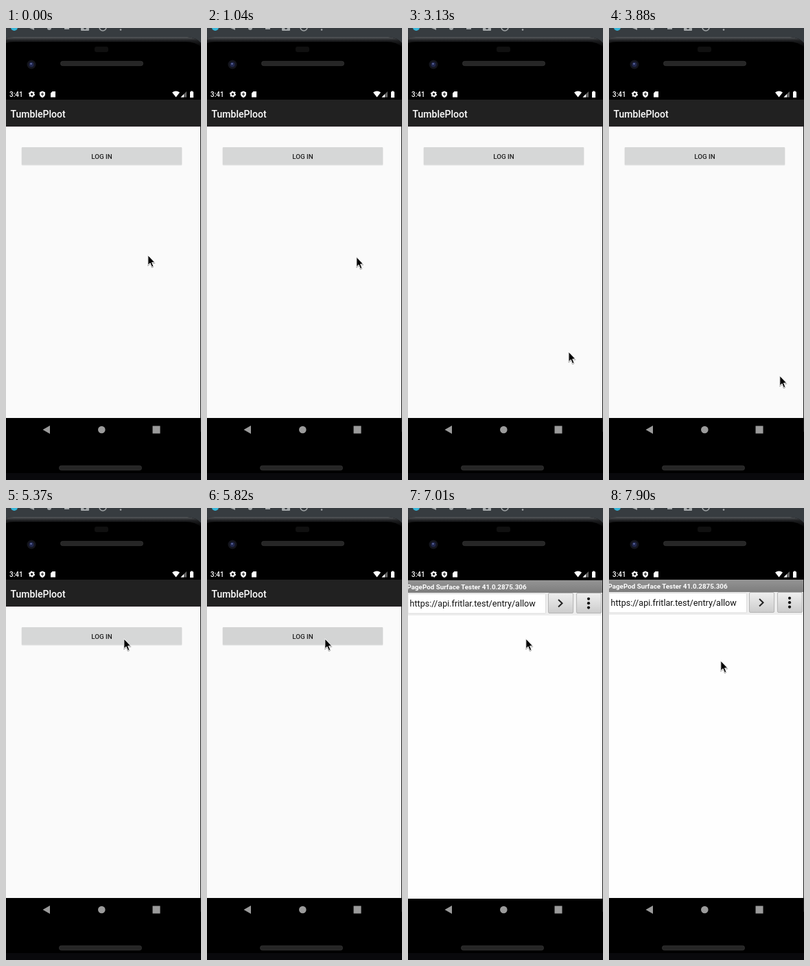
An HTML page for the animation above (8000 ms loop, 284 by 656 pixels).

```html
<!DOCTYPE html>
<html lang="en">
<head>
<meta charset="utf-8">
<title>Log in</title>
<style>
html, body { margin: 0; width: 100%; height: 100%; overflow: hidden; background: #000; }
svg { display: block; width: 284px; height: 656px; font-family: Roboto, sans-serif; }
.medium { font-weight: 500; }
</style>
</head>
<body>
<svg viewBox="0 0 284 656">
  <defs>
    <linearGradient id="titleBar" x2="0" y2="1">
      <stop stop-color="#949494"/><stop offset="1" stop-color="#7d7d7d"/>
    </linearGradient>
    <linearGradient id="key" x2="0" y2="1">
      <stop stop-color="#efefef"/><stop offset="1" stop-color="#cccccc"/>
    </linearGradient>
    <linearGradient id="rim" x2="0" y2="1">
      <stop stop-color="#55585b"/><stop offset=".35" stop-color="#1d1e20"/><stop offset="1" stop-color="#000"/>
    </linearGradient>
    <clipPath id="field"><rect y="122" width="195.5" height="32"/></clipPath>
    <clipPath id="reveal"><rect id="revealBox" width="284" height="656"/></clipPath>
  </defs>

  <!-- emulator toolbar and phone body -->
  <rect width="284" height="24" fill="#373c40"/>
  <circle cx="12" cy="-1" r="5" fill="#35b5d8"/>
  <g fill="#a4a8aa">
    <path d="M34 0h7v3z"/><circle cx="63" cy="0" r="3"/><rect x="85" width="7" height="2"/>
    <rect x="109" y="-3" width="12" height="7" rx="1"/><circle cx="167" cy="2.5" r="1.3"/>
  </g>
  <circle cx="115" cy="0" r="2" fill="#373c40"/>
  <circle cx="141" cy="-1" r="5" fill="none" stroke="#a4a8aa" stroke-width="1.5"/>
  <path d="M0 15Q3 13 12 13H264Q278 14 284 22V656H0z" fill="#000"/>
  <path d="M0 15Q3 13 12 13H264Q278 14 284 22V28Q276 20 262 20H12Q4 20 0 22z" fill="url(#rim)"/>
  <rect x="129" y="27" width="20" height="8" rx="3" fill="#101010"/>
  <circle cx="37" cy="53" r="6.5" fill="#14151d"/>
  <circle cx="37" cy="53" r="3.5" fill="#20264c"/>
  <circle cx="36.5" cy="52" r="1.2" fill="#6570a8"/>
  <g fill="#262626" stroke="#393939" stroke-width=".7">
    <rect x="79.5" y="48.3" width="120" height="6.4" rx="3"/>
    <rect x="77.5" y="635.3" width="120" height="6.4" rx="3"/>
  </g>
  <rect y="646" width="284" height="10" fill="#09090c"/>

  <!-- status bar -->
  <g fill="#fff">
    <text x="5" y="100" font-size="10" class="medium">3:41</text>
    <circle cx="37.5" cy="96" r="2.7" fill="none" stroke="#fff" stroke-width="2"/>
    <circle cx="37.5" cy="96" r="4" fill="none" stroke="#fff" stroke-width="1.2" stroke-dasharray="2 2.19"/>
    <path d="M53 91.5l4 1.7v3q0 3.2-4 4.8q-4-1.6-4-4.8v-3z"/>
    <path d="M67.5 92H72v8.5H65v-6z"/>
    <path d="M242 93.5q5.5-4 11 0l-5.5 7z"/>
    <path d="M263 92v8.5h-8.5z" fill="#666"/><path d="M259 96v4.5h-4.5z"/>
    <path d="M268 92.5h1.3v-1h2.4v1h1.3v8.5h-5z"/>
  </g>
  <path d="M53 93.5v5M50.8 96h4.4" stroke="#000"/>

  <!-- login screen -->
  <rect y="104" width="283" height="39" fill="#212121"/>
  <text x="6.5" y="129.5" font-size="14" class="medium" fill="#fff">TumblePloot</text>
  <rect y="143" width="283" height="423" fill="#fafafa"/>
  <rect y="143" width="283" height="1" fill="#eee4ea"/>
  <rect x="22.5" y="173" width="234" height="26.5" rx="1.5" fill="#e4e4e4"/>
  <rect x="23" y="173" width="233" height="25.5" rx="1" fill="#d6d7d7"/>
  <rect id="press" x="23" y="173" width="233" height="25.5" rx="1"/>
  <text x="139.5" y="189.5" font-size="9.8" class="medium" text-anchor="middle" fill="#212121">LOG IN</text>
  <rect id="dim" y="143" width="283" height="423" opacity="0"/>

  <g fill="#9b9b9b">
    <path d="M53.5 583L64 577V589z"/><circle cx="139.3" cy="583" r="5.3"/>
    <rect x="213.5" y="577.5" width="11" height="11"/>
  </g>

  <!-- browser screen -->
  <g clip-path="url(#reveal)"><g id="browser">
    <rect y="104" width="283" height="462" fill="#fefefe"/>
    <rect y="104" width="283" height="18" fill="url(#titleBar)"/>
    <text x="-1.5" y="116.5" font-size="9.8" font-weight="700" fill="#fff">PagePod Surface Tester 41.0.2875.306</text>
    <rect y="122" width="283" height="33" fill="#eeeeee"/>
    <rect y="123.5" width="200.5" height="28.5" rx="1" fill="#fff" stroke="#dcdcdc"/>
    <text x="2.5" y="142" font-size="12.6" fill="#111" clip-path="url(#field)">https://api.fritlar.test/entry/allow</text>
    <g fill="url(#key)" stroke="#b5b5b5">
      <rect x="204.5" y="122.5" width="36" height="29" rx="1.5"/>
      <rect x="245.5" y="122.5" width="36" height="29" rx="1.5"/>
    </g>
    <path d="M219 132l5.5 5.2l-5.5 5.2" fill="none" stroke="#222" stroke-width="2"/>
    <g fill="#111">
      <circle cx="263" cy="130.8" r="2.1"/><circle cx="263" cy="137.2" r="2.1"/><circle cx="263" cy="143.6" r="2.1"/>
    </g>
  </g></g>
  <rect x="283" y="104" width="1" height="482" fill="#1c1c1c"/>

  <path id="cursor" d="M.8 .8V15.2L4 12.2L6.3 17.8L8.8 16.7L6.5 11.3H10.8z" fill="#000" stroke="#fff" stroke-width="1"
    style="filter:drop-shadow(0 1px .6px #0006)"/>
</svg>
<script>
const LOOP = 8000, STEP = 149.2;
const $ = id => document.getElementById(id);

// Cursor path: step, x, y
const path = [
  [0, 206, 329], [3, 205, 361], [5, 205, 361], [6, 210, 350], [8, 224, 313],
  [10, 206, 352], [12, 167, 371], [13, 170, 372], [14, 177, 377],
  [17, 230, 472], [18, 229, 460], [20, 229, 460], [25, 250, 506], [26, 248, 504],
  [27, 248, 504], [28, 247, 519], [31, 167, 195], [32, 169, 174], [33, 169, 174],
  [34, 171, 189], [51, 171, 189], [52, 162, 207], [53, 162, 221]
];

function cursorAt(n) {
  const i = path.findIndex(p => p[0] >= n);
  if (i <= 0) return path[i < 0 ? path.length - 1 : 0].slice(1);
  const [a, b] = [path[i - 1], path[i]];
  const k = (n - a[0]) / (b[0] - a[0]);
  return [1, 2].map(j => a[j] + (b[j] - a[j]) * k);
}

function draw(now) {
  const n = Math.floor((now % LOOP + 10) / STEP);
  $("cursor").setAttribute("transform", `translate(${cursorAt(n)})`);
  $("press").setAttribute("opacity", n < 38 ? 0 : n < 39 ? .07 : .015);
  $("dim").setAttribute("opacity", n < 45 ? 0 : .02);

  // The browser is uncovered from below while it settles upward.
  const open = n - 45;
  const shift = [20, 3, 1][open] || 0;
  $("browser").setAttribute("transform", `translate(0 ${shift})`);
  $("revealBox").setAttribute("y", open < 0 ? 656 : open < 1 ? 560 : 104);
  requestAnimationFrame(draw);
}
requestAnimationFrame(draw);
</script>
</body>
</html>
```
